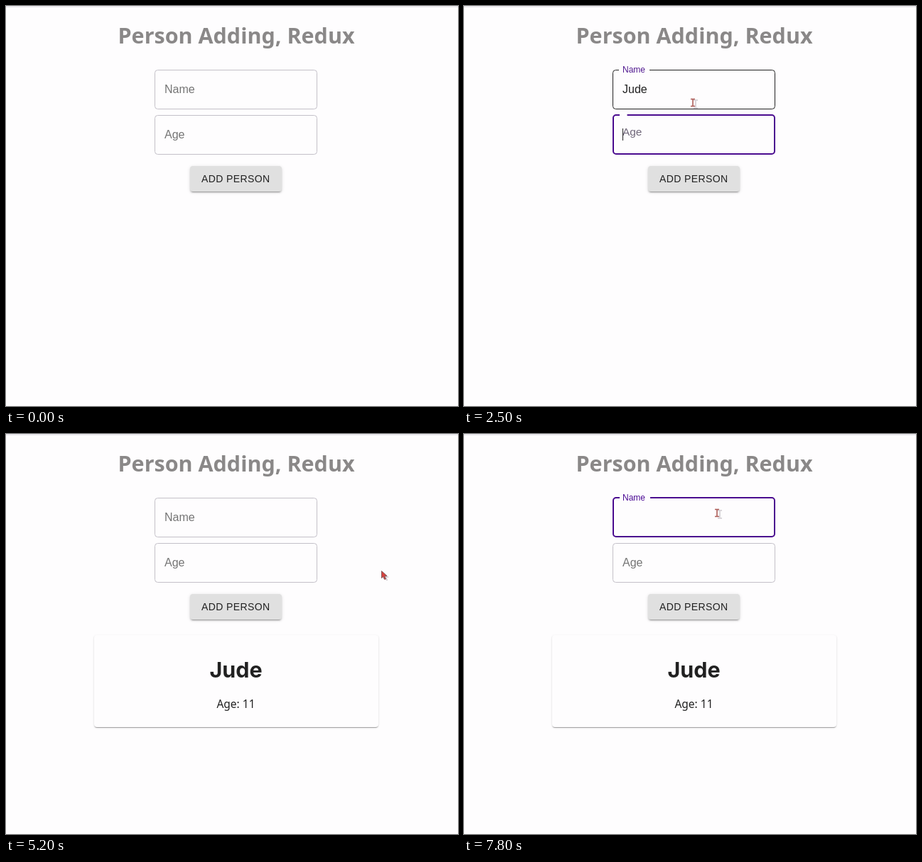
An HTML page for the animation above (8 s loop, 636 by 565 pixels).

```html
<!DOCTYPE html>
<html lang="en">
<head>
<meta charset="utf-8">
<title>Person Adding, Redux</title>
<style>
  html, body { margin: 0; width: 100%; height: 100%; overflow: hidden; background: #fefdfe; }
  #stage { position: relative; width: 636px; height: 565px; overflow: hidden; background: #fefdfe; }
  #stage::before { content: ""; position: absolute; width: 100%; height: 2px; background: #ebe9ee; }
  #card, #button { position: absolute; border-radius: 4px; }
  #card {
    left: 124px; top: 284px; width: 400px; height: 130px; background: #fefdfe;
    box-shadow: 0 2px 1px -1px #0003, 0 1px 1px #00000024, 0 1px 3px #0000001f;
  }
  #button {
    left: 259px; top: 226px; width: 129px; height: 36px; overflow: hidden;
    font: 14px/36px "Liberation Sans", Arial, sans-serif; letter-spacing: .4px;
    text-indent: 16px; white-space: nowrap; color: #212121;
  }
  #ripple {
    position: absolute; left: -4.5px; top: -62px; width: 168px; height: 168px;
    border-radius: 50%; background: #000;
  }
  svg { position: absolute; left: 0; top: 0; }
  svg text { font: 16px "Liberation Sans", Arial, sans-serif; fill: #212121; }
  svg .title { font: bold 30.5px "Noto Sans", sans-serif; fill: #8a8888; text-anchor: middle; }
  svg .name { font: bold 30.5px Inter, sans-serif; text-anchor: middle; }
  svg .age { font: 15.5px "Noto Sans", sans-serif; text-anchor: middle; }
</style>
</head>
<body>
<div id="stage">
  <div id="card"></div>
  <div id="button">ADD PERSON<div id="ripple"></div></div>
  <svg id="svg" width="636" height="565">
    <text class="title" x="324" y="53">Person Adding, Redux</text>
    <g id="person">
      <text class="name" x="323.5" y="344">Jude</text>
      <text class="age" x="323.5" y="387">Age: 11</text>
    </g>
    <g id="fields"></g>
    <g id="pointer">
      <g id="arrow">
        <path d="M3 2v10.5l2.5-2 2 4 1.800-.9-1.800-3.600 3.500-.5z" fill="#d6d2d6"/>
        <path d="M.5.5v10l2.300-1.900 2 3.900 1.700-.8-1.900-3.800 3.400-.4z" fill="#d8433f" stroke="#6f4b4c" stroke-width=".8"/>
      </g>
      <g id="beam" fill="none">
        <path d="M1-4h6M4-4v11M1 7h6" stroke="#dad6da" stroke-width="2"/>
        <path d="M-3-5.500h6M0-5.500v10M-3 4.500h6" stroke="#ad5c57" stroke-width="1.600"/>
      </g>
      <g id="hand" stroke="#000" stroke-linejoin="round">
        <path d="M-1.500 7V0a1.500 1.500 0 0 1 3 0v5q4-.8 7 1 2 .6 2 2.500V11l-1.500 3.500H0L-4.500 9q-1-2.500 1-2.500z" fill="#fff" stroke-width="1.400"/>
        <path d="M1 9.500h1M4 9.500h1M7 9.500h1" stroke-width="1.200"/>
      </g>
    </g>
  </svg>
</div>
<script>
const LOOP = 8000, STEP = 100;
const $ = id => document.getElementById(id);
const clamp = x => Math.min(1, Math.max(0, x));
const mix = (a, b, p) => a + (b - a) * p;
const easeOut = x => 1 - (1 - clamp(x)) ** 3;
const smooth = x => { x = clamp(x); return x * x * (3 - 2 * x); };
const during = (t, spans) => spans.some(([a, b]) => t >= a && t < b);
const ramp = (t, spans, ms) =>
  spans.reduce((sum, [a, b]) => sum + easeOut((t - a) / ms) - easeOut((t - b) / ms), 0);
const latest = (t, steps) => steps.reduce((v, [at, s]) => t >= at ? s : v, "");

function add(tag, attrs) {
  const el = document.createElementNS("http://www.w3.org/2000/svg", tag);
  set(el, attrs);
  return $("fields").appendChild(el);
}
function set(el, attrs) {
  for (const k in attrs) el.setAttribute(k, attrs[k]);
}
const show = (el, on) => { el.style.display = on ? "" : "none"; };

const fields = [
  {
    label: "Name", y: 90, notch: 43,
    focus: [[1050, 2490], [6080, 9e9]],
    shrink: [[1050, 4760], [6080, 9e9]],
    caret: [[1050, 2490], [6080, 6700], [7300, 7800]],
    typed: [[1700, "J"], [2000, "Ju"], [2100, "Jud"], [2300, "Jude"], [4760, ""]]
  },
  {
    label: "Age", y: 154, notch: 32,
    focus: [[2490, 4510]],
    shrink: [[2490, 4760]],
    caret: [[2490, 3700], [4200, 4510]],
    typed: [[3000, "11"], [4760, ""]]
  }
];

for (const f of fields) {
  f.border = add("rect", { fill: "none", rx: 4 });
  f.gap = add("rect", { y: f.y - 2, height: 4, fill: "#fefdfe" });
  f.tag = add("text", {});
  f.tag.textContent = f.label;
  f.value = add("text", { x: 223, y: f.y + 33 });
  f.bar = add("rect", { y: f.y + 19, width: 1, height: 17, fill: "#212121" });
}

// time, x, y of the pointer's hot spot
const track = [
  [400, 301, 53], [500, 301, 53], [600, 314, 104], [700, 322, 137], [3900, 322, 137],
  [4000, 323, 147], [4100, 325, 168], [4200, 329, 203], [4300, 334, 234], [4500, 338.5, 248],
  [4800, 338.5, 248], [4900, 356, 244], [5000, 424, 228], [5100, 502, 205], [5200, 528, 193],
  [5300, 528, 193], [5500, 508, 192], [5700, 425, 168], [5900, 365, 122], [6050, 356, 112]
];

function pointerAt(t) {
  const i = track.findIndex(k => k[0] > t);
  if (i < 0) return track[track.length - 1].slice(1);
  const [a, b] = [track[Math.max(0, i - 1)], track[i]];
  const p = clamp((t - a[0]) / (b[0] - a[0]));
  return [mix(a[1], b[1], p), mix(a[2], b[2], p)];
}
const inside = ([x, y], l, t, r, b) => x >= l && x < r && y >= t && y < b;

function drawField(f, t, hover) {
  const focused = during(t, f.focus);
  const x = focused ? 210 : 209.5, top = f.y + (focused ? 0 : .5);
  set(f.border, {
    x, y: top, width: focused ? 227 : 228, height: 55,
    "stroke-width": focused ? 2 : 1,
    stroke: focused ? "#4a0b8f" : hover ? "#212121" : "#c3c0c8"
  });
  set(f.gap, { x: focused ? 219 : 218, width: f.notch * ramp(t, f.shrink, 80) });

  const p = ramp(t, f.shrink, 200), c = ramp(t, f.focus, 200);
  const rgb = [mix(117, 75, c), mix(117, 10, c), mix(117, 148, c)].map(Math.round);
  set(f.tag, {
    transform: `translate(223 ${mix(f.y + 33, f.y + 4, p)}) scale(${mix(1, .75, p)})`,
    style: `fill: rgb(${rgb})`
  });

  f.value.textContent = latest(t, f.typed);
  f.bar.setAttribute("x", 223 + Math.round(f.value.getComputedTextLength()));
  show(f.bar, during(t, f.caret));
}

function drawButton(t) {
  const over = ramp(t, [[4260, 4880]], 250);
  const press = ramp(t, [[4510, 4760]], 250);
  const grey = Math.round(mix(224, 213, over));
  const lift = (a, b, c) => mix(mix(a, b, over), c, press) + "px";
  $("button").style.background = `rgb(${grey},${grey},${grey})`;
  $("button").style.boxShadow =
    `0 ${lift(3, 2, 5)} ${lift(1, 4, 5)} ${lift(-2, -1, -3)} #0003,` +
    `0 ${lift(2, 4, 8)} ${lift(2, 5, 10)} ${lift(0, 0, 1)} #00000024,` +
    `0 ${lift(1, 1, 3)} ${lift(5, 10, 14)} ${lift(0, 0, 2)} #0000001f`;

  const grow = smooth((t - 4435) / 510);
  const fade = 1 - smooth((t - 4740) / 460);
  show($("ripple"), t >= 4510 && fade > 0);
  $("ripple").style.transform = `scale(${grow})`;
  $("ripple").style.opacity = mix(.1, .3, grow) * fade;
}

function render(t) {
  const pos = pointerAt(t), visible = t >= 400;
  const hovers = fields.map(f => visible && inside(pos, 209, f.y, 438, f.y + 56));
  const onButton = inside(pos, 259, 226, 388, 262);
  fields.forEach((f, i) => drawField(f, t, hovers[i]));
  drawButton(t);

  show($("card"), t >= 4760);
  show($("person"), t >= 4760);
  show($("pointer"), visible);
  set($("pointer"), { transform: `translate(${pos})` });
  const onField = hovers.includes(true);
  show($("beam"), onField);
  show($("hand"), onButton);
  show($("arrow"), !onField && !onButton);
}

const start = performance.now();
function tick() {
  const t = (performance.now() - start) % LOOP;
  render(Math.floor(t / STEP) * STEP);
  requestAnimationFrame(tick);
}
tick();
</script>
</body>
</html>
```
